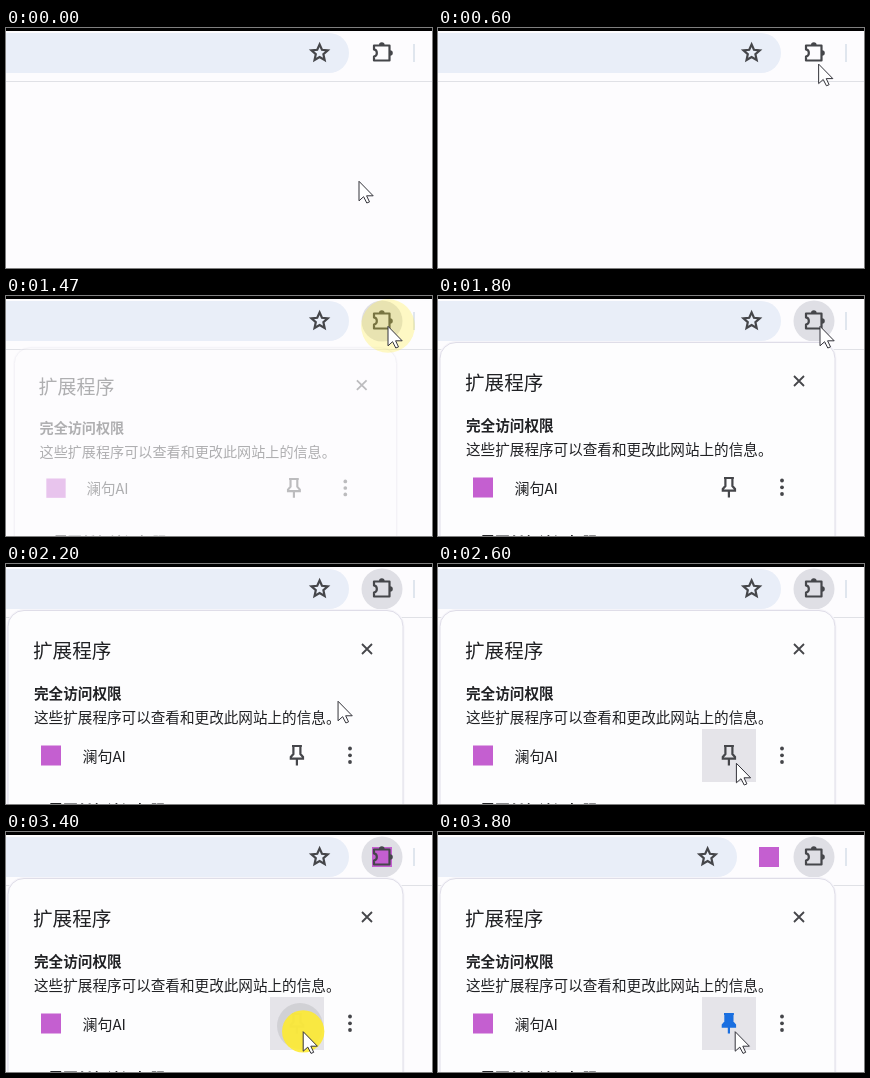
Animation of 426x240 px, one loop 3870 ms. Source, as an HTML page:

```html
<!DOCTYPE html>
<html lang="zh-CN">
<head>
<meta charset="utf-8">
<style>
  html, body { margin: 0; width: 100%; height: 100%; overflow: hidden; background: #fdfcfe; }
  svg { display: block; width: 100%; height: 100%; }
  text { font-family: "Noto Sans CJK SC", "Noto Sans CJK", sans-serif; font-size: 14.6px; fill: #202124; }
  .line { fill: none; stroke: #45464a; stroke-width: 2.2; }
</style>
</head>
<body>
<svg viewBox="0 0 426 240">
  <rect width="426" height="240" fill="#fdfcfe"/>
  <rect width="426" height="3" fill="#000"/>
  <path d="M0 53.5H426" stroke="#e0e1e6"/>

  <g id="bar">
    <rect x="-100" y="5" width="443" height="40" rx="20" fill="#e9eef8"/>
    <path id="star" class="line"/>
  </g>
  <circle id="halo" cx="376" cy="25" r="20.5" fill="#dfdfe5"/>
  <rect id="badge" x="366" y="15" width="20" height="20" fill="#c45fd0"/>
  <g id="puzzle">
    <path class="line" stroke-linejoin="round"
      d="M368 17.5H383.5V32.5H368V28.6A3.7 3.7 0 0 0 368 21.4Z"/>
    <path fill="#45464a" d="M373 17a2.8 2.8 0 0 1 5.6 0ZM384 22.2a2.8 2.8 0 0 1 0 5.6Z"/>
  </g>
  <path d="M408 16V34" stroke="#d9e0ea" stroke-width="1.6"/>

  <g id="panel">
    <rect x="1.5" y="46" width="396" height="380" rx="17" fill="none" stroke="#f5f4f9" stroke-width="2"/>
    <rect x="2" y="46.5" width="395" height="380" rx="16" fill="#fdfdfe" stroke="#dfdde8"/>
    <text x="27" y="94.3" style="font-size:19.6px" font-weight="300">扩展程序</text>
    <path class="line" style="stroke-width:1.8" d="M356 80L366 90M366 80L356 90"/>
    <text x="28" y="135" font-weight="700">完全访问权限</text>
    <text x="28" y="159.3">这些扩展程序可以查看和更改此网站上的信息。</text>
    <rect x="35" y="181.5" width="20" height="20" fill="#c45fd0"/>
    <text x="76.5" y="197.6" style="font-size:15px">澜句AI</text>
    <rect id="cell" x="264" y="165" width="54" height="53" fill="#e5e4e9"/>
    <circle id="ripple" cx="294" cy="194" r="23" fill="#c9c9ce"/>
    <g id="pin">
      <path id="head" class="line" d="M287.4 182V190L284.8 193V194.6H297V193L294.4 190V182Z"/>
      <path id="needle" class="line" d="M286 182H295.8M290.9 194.5V201.5"/>
    </g>
    <g fill="#45464a">
      <circle cx="344" cy="184.5" r="1.9"/>
      <circle cx="344" cy="191.3" r="1.9"/>
      <circle cx="344" cy="198" r="1.9"/>
    </g>
    <text x="28" y="252.2" font-weight="700">不需要任何访问权限</text>
  </g>

  <g id="cursor">
    <circle id="click" fill="#ffec2a"/>
    <path d="M0 .3V19.8L4.6 15.7L7.8 22L10.5 20.9L7.6 14.8H14.2Z"
      fill="#fff" stroke="#33333a" stroke-width="1" stroke-linejoin="round"/>
  </g>
</svg>
<script>
const LOOP = 3870, STEP = 1000 / 15;
const OPEN = 1400, PINNED = 3400, CLICKS = [1270, 3330];
const MOVES = [
  { from: 67, to: 757, a: [353, 153], b: [382, 30], bow: 0 },
  { from: 1830, to: 2504, a: [382, 30], b: [298.4, 199], bow: 3.2 },
  { from: 3067, to: 3267, a: [298.4, 199], b: [297.2, 199.4], bow: 0 }
];

const ui = {};
document.querySelectorAll('[id]').forEach(el => ui[el.id] = el);
const set = (el, attrs) => { for (const k in attrs) el.setAttribute(k, attrs[k]); };
const span = (t, a, b) => Math.min(1, Math.max(0, (t - a) / (b - a)));
const ease = p => p < .5 ? 4 * p ** 3 : 1 - 4 * (1 - p) ** 3;
const smooth = p => p * p * (3 - 2 * p);

const starPoints = Array.from({ length: 10 }, (_, i) => {
  const r = i % 2 ? 4 : 8.6, a = (i / 5 - .5) * Math.PI;
  return `${313.6 + r * Math.cos(a)} ${25 + r * Math.sin(a)}`;
});
set(ui.star, { d: `M${starPoints.join('L')}Z` });

function cursorAt(t) {
  const m = MOVES.filter(m => t >= m.from).pop() || MOVES[0];
  const f = ease(span(t, m.from, m.to));
  return [
    m.a[0] + (m.b[0] - m.a[0]) * f + m.bow * 4 * f * (1 - f),
    m.a[1] + (m.b[1] - m.a[1]) * f
  ];
}

function drawClick(t) {
  const start = CLICKS.find(c => t >= c && t < c + 300);
  const p = start === undefined ? 1 : (t - start) / 300;
  set(ui.click, { r: 18 + 13.5 * p, opacity: 1 - smooth(p) });
}

function drawPin(t) {
  const on = t >= PINNED + 30;
  const color = on ? '#1a6fe0' : '#45464a';
  const busy = t >= CLICKS[1] && t < PINNED + 60;
  set(ui.pin, { opacity: busy ? .12 : 1 });
  ui.head.style.fill = on ? color : 'none';
  ui.head.style.stroke = ui.needle.style.stroke = color;
  const fade = t < CLICKS[1] ? 0 : 1 - span(t, PINNED, 3650);
  set(ui.ripple, { opacity: .7 * fade });
}

function draw(t) {
  const [x, y] = cursorAt(t);
  set(ui.cursor, { transform: `translate(${x} ${y})` });
  drawClick(t);

  const shown = span(t, OPEN, OPEN + 190);
  const k = .95 + .05 * shown;
  set(ui.panel, {
    opacity: shown,
    transform: `translate(199 212) scale(${k}) translate(-199 -212)`
  });
  set(ui.halo, { opacity: span(t, 620, 760) });

  const hover = x > 264 && x < 318 && y > 165 && y < 218;
  set(ui.cell, { opacity: hover ? 1 : 0 });
  drawPin(t);

  const slide = ease(span(t, PINNED, 3700));
  set(ui.bar, { transform: `translate(${-44 * slide} 0)` });
  set(ui.badge, {
    transform: `translate(${-45 * slide} 0)`,
    opacity: t >= PINNED - 5 ? 1 : 0
  });
}

const origin = performance.now();
function tick() {
  const t = (performance.now() - origin) % LOOP;
  draw(Math.floor((t + 4) / STEP) * STEP);
  requestAnimationFrame(tick);
}
tick();
</script>
</body>
</html>
```
